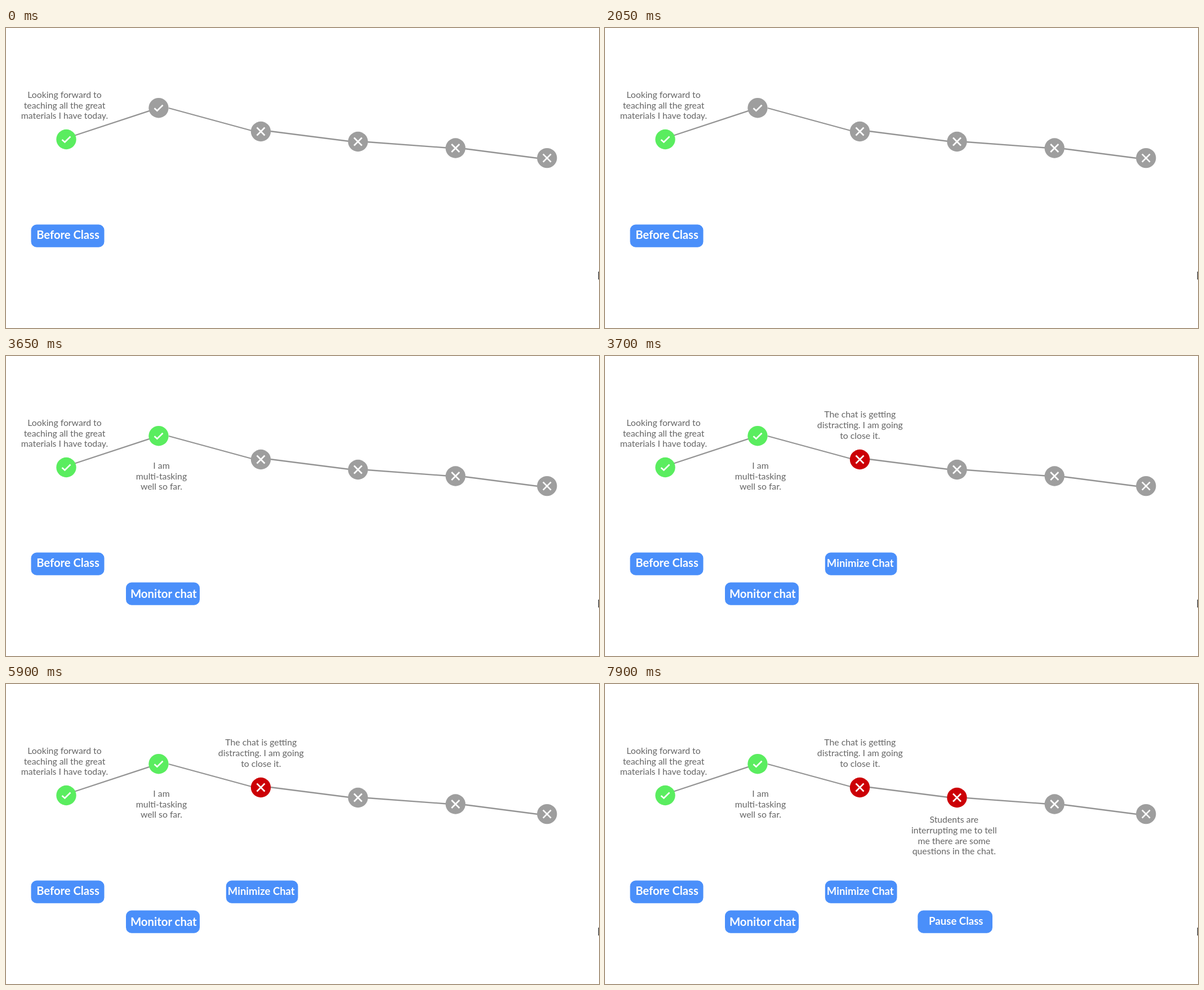
An HTML page for the animation above (8 s loop, 1053 by 532 pixels).

```html
<!DOCTYPE html>
<html lang="en">
<meta charset="utf-8">
<title>Class journey</title>
<style>
  html, body { margin: 0; height: 100%; overflow: hidden; background: #fff; }
  svg { display: block; width: 1053px; height: 532px; font-family: Lato, sans-serif; text-anchor: middle; }
  .route { stroke: #949494; stroke-width: 2.3; }
  .icon { fill: none; stroke: #fff; stroke-width: 2.7; }
  .caption { fill: #666; font-size: 15.8px; }
  .label { fill: #fff; font-weight: 700; }
</style>
<svg id="stage" viewBox="0 0 1053 532"></svg>
<script>
const LOOP = 8000, GRAY = '#9e9e9e', GREEN = '#5aed5f', RED = '#cc0006';
const CHECK = 'M-7.5 .5L-2.6 5L7.5 -5', CROSS = 'M-7 -7L7 7M7 -7L-7 7';

const routes = [
  [107, 195.5, 271, 141.5], [289, 142, 438, 182.5], [469, 183, 610, 201],
  [641, 202, 783, 212.5], [814, 214, 945, 231]
];

const steps = [
  { x: 107, y: 197.5, icon: CHECK, color: GREEN, at: 0,
    caption: [104, 124, 'Looking forward to', 'teaching all the great', 'materials I have today.'],
    button: [44.5, 348.5, 130, 110, 374, 20.2, 'Before Class'] },
  { x: 271, y: 141.7, icon: CHECK, color: GREEN, at: 2100,
    caption: [276, 199.8, 'I am', 'multi-tasking', 'well so far.'],
    button: [213, 401.5, 131, 279.8, 429, 20.4, 'Monitor chat'] },
  { x: 452.5, y: 183.5, icon: CROSS, color: RED, at: 3700,
    caption: [452.8, 109.3, 'The chat is getting', 'distracting. I am going', 'to close it.'],
    button: [390.8, 348.5, 127.7, 453.3, 374, 18.5, 'Minimize Chat'] },
  { x: 625, y: 201.5, icon: CROSS, color: RED, at: 5950,
    caption: [619.8, 246.2, 'Students are', 'interrupting me to tell', 'me there are some', 'questions in the chat.'],
    button: [555.3, 401.5, 132.7, 623.3, 427, 18.6, 'Pause Class'] },
  { x: 798.2, y: 213, icon: CROSS },
  { x: 960.7, y: 230.6, icon: CROSS }
];

const stage = document.getElementById('stage');

function add(parent, tag, attrs, text = '') {
  const el = document.createElementNS('http://www.w3.org/2000/svg', tag);
  for (const key in attrs) el.setAttribute(key, attrs[key]);
  el.textContent = text;
  return parent.appendChild(el);
}

for (const [x1, y1, x2, y2] of routes) add(stage, 'line', { class: 'route', x1, y1, x2, y2 });

for (const step of steps) {
  const node = add(stage, 'g', { transform: `translate(${step.x} ${step.y})` });
  step.dot = add(node, 'circle', { r: 17.7, fill: GRAY });
  add(node, 'path', { class: 'icon', d: step.icon });
  if (!step.caption) continue;

  step.details = add(stage, 'g', {});
  const [cx, top, ...lines] = step.caption;
  lines.forEach((line, i) => add(step.details, 'text', { class: 'caption', x: cx, y: top + i * 18.7 }, line));
  const [x, y, width, labelX, labelY, size, label] = step.button;
  add(step.details, 'rect', { x, y, width, height: 40.2, rx: 10, fill: '#4a8ffa' });
  add(step.details, 'text', { class: 'label', x: labelX, y: labelY, 'font-size': size }, label);
}

// Sliver of a pointer at the right edge
add(stage, 'rect', { x: 1051.7, y: 432, width: 1.3, height: 14, fill: '#333' });

function draw() {
  const time = performance.now() % LOOP;
  for (const step of steps) {
    if (!step.details) continue;
    const active = time >= step.at;
    step.dot.setAttribute('fill', active ? step.color : GRAY);
    step.details.setAttribute('visibility', active ? 'visible' : 'hidden');
  }
  requestAnimationFrame(draw);
}
draw();
</script>
</html>
```
